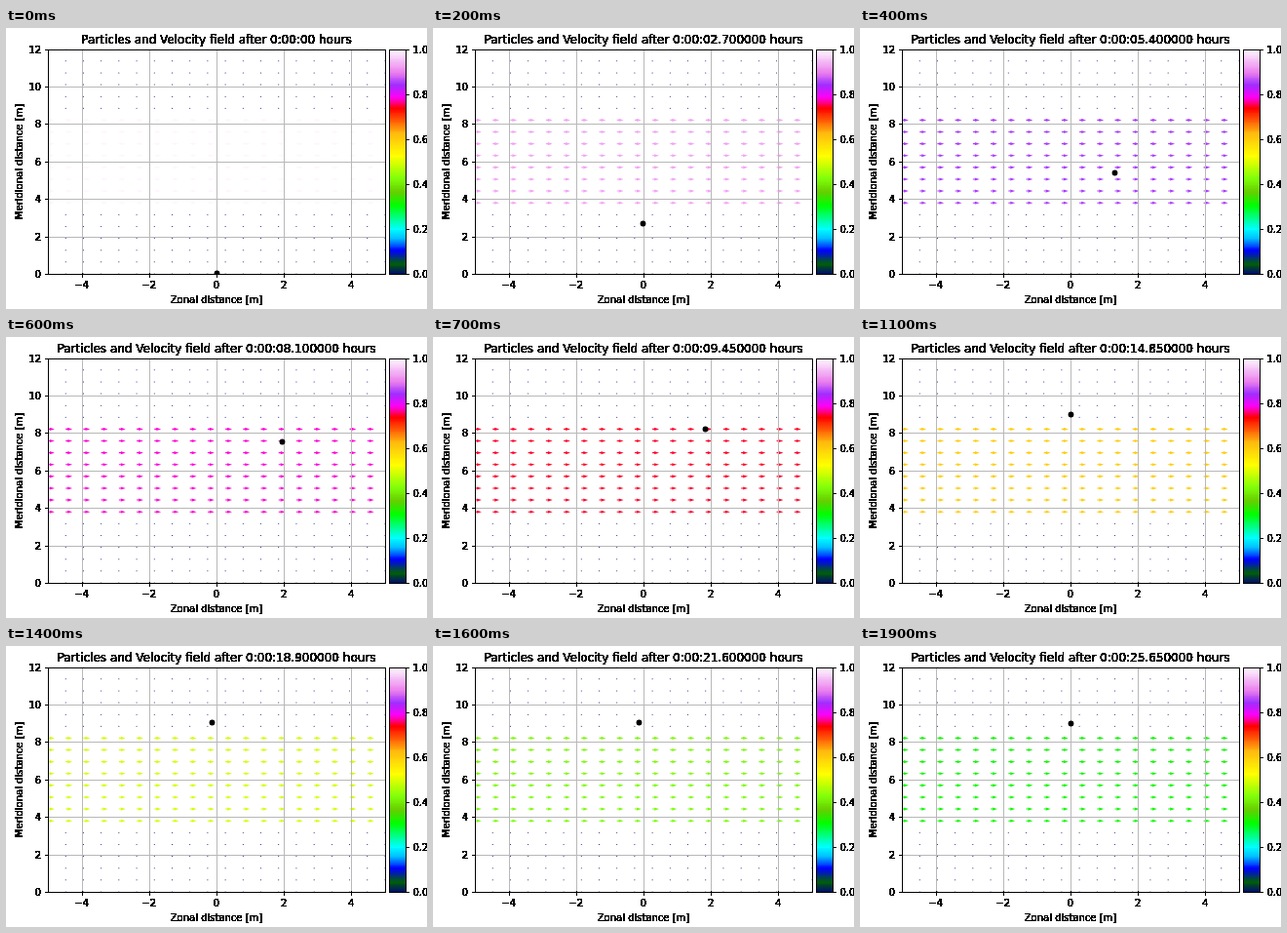
An HTML page with a canvas that plays this animation: 432 px wide and 288 px high, repeating every 2000 ms.

```html
<!DOCTYPE html>
<html lang="en">
<head>
<meta charset="utf-8">
<title>Particles and Velocity field</title>
<style>
  html, body { margin: 0; width: 100%; height: 100%; overflow: hidden; background: #fff; }
  canvas { display: block; width: 432px; height: 288px; }
</style>
</head>
<body>
<canvas id="plot" width="432" height="288"></canvas>
<script>
const WIDTH = 432, HEIGHT = 288;
const STEPS = 20, STEP_MS = 100, STEP_SECONDS = 1.35, SUBSTEPS = 9;
const LEFT = 43, RIGHT = 389, TOP = 21.7, BOTTOM = 251.9;
const BAR_LEFT = 393.5, BAR_RIGHT = 410.5;
const GRID = 20, FIRST_ROW = 6, LAST_ROW = 13, ROW_GAP = 12 / (GRID - 1);
const HOME = { x: -.07, y: 9.02 };

const ctx = document.getElementById('plot').getContext('2d');
const ink = newLayer(WIDTH, HEIGHT);
const palette = buildPalette();

const toX = x => LEFT + (x + 5) / 10 * (RIGHT - LEFT);
const toY = y => BOTTOM - y / 12 * (BOTTOM - TOP);
const snap = v => Math.round(v) + 0.5;
const clamp = v => Math.min(1, Math.max(0, v));

function newLayer(width, height) {
  const canvas = document.createElement('canvas');
  canvas.width = width;
  canvas.height = height;
  return canvas.getContext('2d', { willReadFrequently: true });
}

// Key colours with their place on the scale in percent.
function buildPalette() {
  const keys = 'navy 0, #005f06 5, blue 11, #00b8ff 16, cyan 20.5, lime 31, #66ce00 37, #80ff09 43, ' +
    'yellow 53, #ffba0e 63, red 74, #ff00f8 79, #9f2dff 84.5, #eb80ee 90, #fef8fe 100';
  const layer = newLayer(256, 1);
  const gradient = layer.createLinearGradient(0, 0, 256, 0);
  for (const key of keys.split(', ')) {
    const [name, percent] = key.split(' ');
    gradient.addColorStop(percent / 100, name);
  }
  layer.fillStyle = gradient;
  layer.fillRect(0, 0, 256, 1);
  return layer.getImageData(0, 0, 256, 1).data;
}

function colour(v) {
  const i = 4 * Math.round(v * 255);
  return `rgb(${palette.slice(i, i + 3)})`;
}

const speedAt = step => 1 - 0.036 * step;

// The current fades out linearly over one row beyond the flowing band.
const bandShare = y => clamp(y / ROW_GAP - FIRST_ROW + 1) * clamp(LAST_ROW + 1 - y / ROW_GAP);

// Swims home at 1 m/s while the current pushes sideways, then overshoots to and fro.
function swimmer(step) {
  const dt = STEP_SECONDS / SUBSTEPS;
  let x = 0, y = 0;
  for (let n = 0; n < step * SUBSTEPS; n++) {
    const dx = HOME.x - x, dy = HOME.y - y, distance = Math.hypot(dx, dy);
    if (distance < dt) {
      const side = step % 2 ? 1 : -1;
      return [HOME.x + side * .07, HOME.y - side * .02];
    }
    x += dt * (dx / distance + speedAt(n / SUBSTEPS) * bandShare(y));
    y += dt * dy / distance;
  }
  return [x, y];
}

function line(layer, x1, y1, x2, y2) {
  layer.beginPath();
  layer.moveTo(x1, y1);
  layer.lineTo(x2, y2);
  layer.stroke();
}

function frame(left, right) {
  ink.strokeRect(left, snap(TOP), right - left, snap(BOTTOM) - snap(TOP));
}

function label(text, x, y, align = 'center', size = 10) {
  ink.font = `${size}px "DejaVu Sans", sans-serif`;
  ink.textAlign = align;
  ink.fillText(text, x, y);
}

function disc(x, y, r) {
  ctx.beginPath();
  ctx.arc(x, y, r, 0, 2 * Math.PI);
  ctx.fill();
}

function arrow(x, y) {
  const tip = x + 6.92, neck = tip - 4.67, barb = tip - 5.19, shaft = 0.52, head = 1.56;
  ctx.beginPath();
  ctx.moveTo(x, y - shaft);
  ctx.lineTo(neck, y - shaft);
  ctx.lineTo(barb, y - head);
  ctx.lineTo(tip, y);
  ctx.lineTo(barb, y + head);
  ctx.lineTo(neck, y + shaft);
  ctx.lineTo(x, y + shaft);
  ctx.fill();
}

function drawField(speed) {
  for (let row = 0; row < GRID; row++) {
    const flows = row >= FIRST_ROW && row <= LAST_ROW;
    const y = toY(row * ROW_GAP);
    ctx.fillStyle = colour(flows ? speed : 0);
    for (let col = 0; col < GRID; col++) {
      const x = toX(-5 + 10 * col / (GRID - 1));
      if (flows) arrow(x, y);
      else disc(x, y, 0.52);
    }
  }
}

function drawGrid() {
  ctx.strokeStyle = '#b8b8b8';
  for (let x = -4; x <= 4; x += 2) line(ctx, snap(toX(x)), TOP, snap(toX(x)), BOTTOM);
  for (let y = 0; y <= 12; y += 2) line(ctx, LEFT, snap(toY(y)), RIGHT, snap(toY(y)));
}

function drawColourBar() {
  const bottom = Math.round(BOTTOM), height = bottom - Math.round(TOP);
  for (let i = 0; i < height; i++) {
    ctx.fillStyle = colour((i + 0.5) / height);
    ctx.fillRect(BAR_LEFT, bottom - i, BAR_RIGHT - BAR_LEFT, 1);
  }
}

function inkAxes() {
  frame(snap(LEFT), snap(RIGHT));
  for (let x = -4; x <= 4; x += 2) {
    line(ink, snap(toX(x)), BOTTOM, snap(toX(x)), BOTTOM + 4);
    label(String(x).replace('-', '\u2212'), toX(x), 267);
  }
  for (let y = 0; y <= 12; y += 2) {
    line(ink, LEFT - 3, snap(toY(y)), LEFT, snap(toY(y)));
    label(y, 36, Math.round(toY(y) + 4), 'right');
  }
  frame(BAR_LEFT, BAR_RIGHT);
  for (let i = 0; i <= 5; i++) {
    const y = toY(i * 2.4);
    line(ink, BAR_RIGHT, snap(y), BAR_RIGHT + 3.5, snap(y));
    label((i / 5).toFixed(1), 417.5, Math.round(y + 4), 'left');
  }
  label('Zonal distance [m]', 216, 282);
  ink.save();
  ink.translate(16.5, 137);
  ink.rotate(-Math.PI / 2);
  label('Meridional distance [m]', 0, 0);
  ink.restore();
}

// Turns every touched pixel solid, which gives the lettering its hard, heavy edge.
function hardenInk() {
  const image = ink.getImageData(0, 0, WIDTH, HEIGHT);
  for (let i = 3; i < image.data.length; i += 4) image.data[i] = image.data[i] > 16 ? 255 : 0;
  ink.putImageData(image, 0, 0);
}

function draw(step) {
  ctx.fillStyle = '#fff';
  ctx.fillRect(0, 0, WIDTH, HEIGHT);

  ctx.save();
  ctx.beginPath();
  ctx.rect(LEFT, TOP, RIGHT - LEFT, BOTTOM - TOP);
  ctx.clip();
  drawField(speedAt(step));
  drawGrid();
  const [x, y] = swimmer(step);
  ctx.fillStyle = '#000';
  disc(Math.floor(toX(x)) + 0.5, Math.floor(toY(y)) + 0.5, 2.9);
  ctx.restore();
  drawColourBar();

  ink.clearRect(0, 0, WIDTH, HEIGHT);
  inkAxes();
  const seconds = step ? (step * STEP_SECONDS).toFixed(6).padStart(9, '0') : '00';
  label(`Particles and Velocity field after 0:00:${seconds} hours`, 216, 16, 'center', 12);
  hardenInk();
  ctx.drawImage(ink.canvas, 0, 0);
}

let shown = -1;
function tick() {
  const step = Math.floor(performance.now() / STEP_MS) % STEPS;
  if (step !== shown) draw(shown = step);
  requestAnimationFrame(tick);
}
tick();
</script>
</body>
</html>
```
